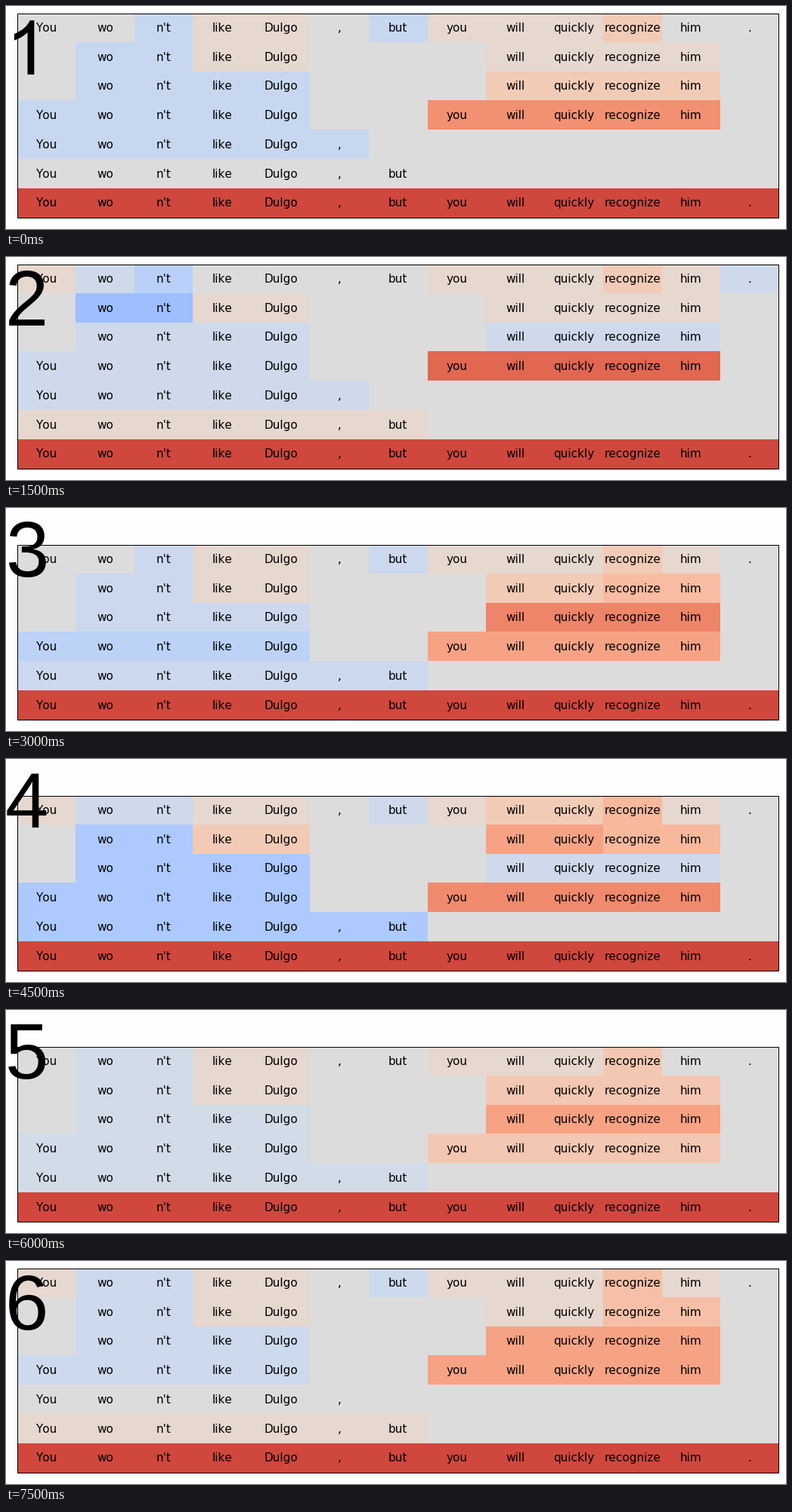
A matplotlib script that plays this animation: 1032x296 px, repeating every 8 s.

```python
import math

import matplotlib.pyplot as plt
from matplotlib.animation import FuncAnimation
from matplotlib.patches import PathPatch, Rectangle
from matplotlib.path import Path

plt.rcParams["text.kerning_factor"] = 6

W, H, DPI = 1032, 296, 100
PX = 72 / DPI                 # points per pixel
INTERVAL, HOLD, FRAMES = 500, 3, 16
LEFT, COL, ROW = 14.88, 77.52, 38.72
TOP = {7: 10.11, 6: 49.15}    # by number of rows
BOX = 15, 1022, 281           # left, right and bottom border pixels

WORDS = "You wo n't like Dulgo , but you will quickly recognize him .".split()
LOW_WORDS = {"wo", "n't", "but"}
HIGH_WORDS = {"like", "Dulgo", "you", "will", "quickly", "him"}

# Phrases as word ranges, layer by layer below the single words
LAYERS = [[(1, 3), (3, 5), (8, 10), (10, 12)],
          [(1, 5), (8, 12)],
          [(0, 5), (7, 12)],
          [(0, 6)],
          [(0, 7)],
          [(0, 13)]]

HIGH, WHOLE = .037, .42


def step(low, peak, words, phrases):
    """Scores of all rows: words follow a common rule with a few exceptions."""
    def word_score(w):
        if w in words:
            return words[w]
        if w == "recognize":
            return peak
        return low if w in LOW_WORDS else HIGH if w in HIGH_WORDS else 0

    rows = [[((i, i + 1), word_score(w)) for i, w in enumerate(WORDS)]]
    tones = {"low": low, "peak": peak}
    for spans, scores in zip(LAYERS, phrases + [[WHOLE]]):
        if scores:
            rows.append([(s, tones.get(v, v)) for s, v in zip(spans, scores)])
    return rows


STEPS = [
    step(-.075, .1, {"wo": 0, "him": 0},
         [["low", HIGH, HIGH, HIGH], ["low", "peak"], ["low", .27],
          ["low"], [0]]),
    step(-.052, .1, {"You": HIGH, "n't": -.12, "like": 0, "Dulgo": 0,
                     "but": 0, ".": -.052},
         [[-.2, HIGH, HIGH, HIGH], ["low", "low"], ["low", .36],
          ["low"], [HIGH]]),
    step(-.063, .1, {"wo": 0},
         [["low", HIGH, "peak", .155], ["low", .3], [-.11, .225],
          None, ["low"]]),
    step(-.052, .165, {"You": HIGH, "will": .1, "quickly": .1},
         [[-.16, .1, .225, "peak"], [-.16, "low"], [-.16, .287],
          None, [-.16]]),
    step(-.042, .115, {"but": 0, "him": 0},
         [["low", HIGH, "peak", "peak"], ["low", .23], ["low", "peak"],
          None, ["low"]]),
    step(-.057, .14, {"You": HIGH},
         [["low", HIGH, HIGH, "peak"], ["low", .225], ["low", .225],
          [0], [HIGH]]),
]

fig = plt.figure(figsize=(W / DPI, H / DPI), dpi=DPI, facecolor="#fefefe")
ax = fig.add_axes([0, 0, 1, 1])
heat = plt.get_cmap("coolwarm")


def clamp(v, lo, hi):
    return max(lo, min(hi, v))


def fill(x0, y0, x1, y1, score):
    ax.add_patch(Rectangle((x0, y0), x1 - x0, y1 - y0, fc=heat(.5 + score),
                           lw=0, aa=False))


def draw_grid(rows):
    x0, x1, y1 = BOX
    top = TOP[len(rows)]
    y0 = math.floor(top)

    def col_edge(i):
        return clamp(round(LEFT + COL * i), x0, x1)

    def row_edge(i):
        if i == len(rows):
            return y1
        return clamp(math.floor(top - .4 + ROW * i), y0, y1)

    fill(x0, y0, x1, y1, 0)
    for r, spans in enumerate(rows):
        for (a, b), score in spans:
            fill(col_edge(a), row_edge(r), col_edge(b), row_edge(r + 1), score)
            for c in range(a, b):
                ax.text(LEFT + COL * (c + .5), top + ROW * (r + .5), WORDS[c],
                        ha="center", va="center", size=11,
                        family="DejaVu Sans")
    ax.add_patch(Rectangle((x0 + .5, y0 + .5), x1 - x0, y1 - y0, fc="none",
                           ec="black", lw=PX, snap=False))


def draw_digit(n):
    if n > 1:
        ax.text(-1.3, 91, str(n), size=103 * PX, family="Liberation Sans",
                va="baseline", zorder=5)
        return
    # A one without a foot serif: stem and curved flag
    pts = [(37.3, 91), (28.5, 91), (28.5, 35), (21, 42.5), (10.9, 45.6),
           (10.9, 37.1), (27.5, 30), (31.6, 19.1), (37.3, 19.1), (37.3, 91)]
    codes = [Path.MOVETO, Path.LINETO, Path.LINETO, Path.CURVE3, Path.CURVE3,
             Path.LINETO, Path.CURVE3, Path.CURVE3, Path.LINETO,
             Path.CLOSEPOLY]
    ax.add_patch(PathPatch(Path(pts, codes), fc="black", lw=0, zorder=5))


def draw(frame):
    ax.clear()
    ax.set(xlim=(0, W), ylim=(H, 0))
    ax.axis("off")
    i = frame // HOLD
    draw_grid(STEPS[i])
    draw_digit(i + 1)
    return []


anim = FuncAnimation(fig, draw, frames=FRAMES, interval=INTERVAL,
                     init_func=lambda: draw(0), repeat=True, repeat_delay=0)
plt.show()
```
